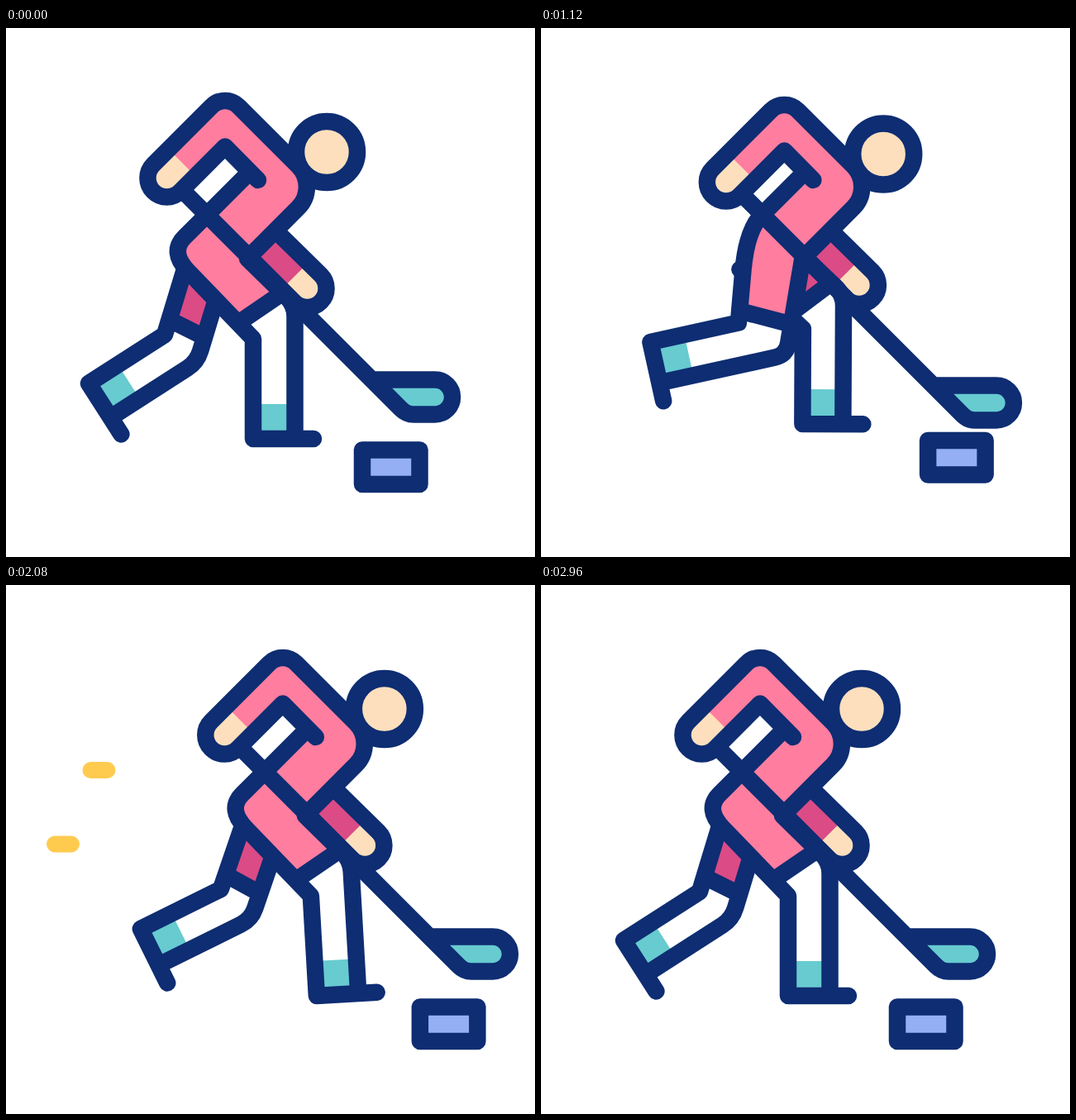
An HTML page for the animation above (3 s loop, 640 by 640 pixels).

```html
<!DOCTYPE html>
<html lang="en">
<head>
<meta charset="utf-8">
<title>Hockey player</title>
<style>
  html, body { margin: 0; width: 100%; height: 100%; overflow: hidden; background: #fff; }
  svg { display: block; width: 100vw; height: 100vh; }
  .ink, .speed { stroke: #0e2d72; stroke-width: 20.5; stroke-linecap: round; stroke-linejoin: round; }
  .speed { stroke: #ffcb4f; stroke-width: 20; }
  .none { fill: none; }
  .pink { fill: #ff7d9f; }
  .rose { fill: #db4b86; }
  .skin { fill: #fddfbd; }
  .teal { fill: #67cbd0; }
  .white { fill: #fff; }
  .blue { fill: #94aff4; }
</style>
</head>
<body>
<svg viewBox="0 0 640 640">
  <rect id="puck" class="ink blue" x="431" y="510.5" width="69.5" height="41.5"/>
  <g id="skater">
    <g id="farArm">
      <path class="rose" d="M326 245L380.8 298.7L348.2 331.3L300 283Z"/>
      <path class="skin" d="M365.8 283.7L380.8 298.7A23 23 0 0 1 348.2 331.3L333.2 316.3Z"/>
      <path class="ink none" d="M326 245L380.8 298.7A23 23 0 0 1 348.2 331.3L300 283"/>
    </g>
    <g id="farLeg"></g>
    <g id="nearLeg"></g>
    <path id="torso" class="pink"/>
    <path id="hand" class="skin" d="M229.3 179.3L210.8 197.8A23 23 0 0 1 178.2 165.2L196.7 146.7Z"/>
    <path id="outline" class="ink none"/>
    <path id="stick" class="ink teal" d="M218 201L478 461Q484.500 467.500 493 467.500H519A21 21 0 0 0 519 425.500H443"/>
    <circle id="head" class="ink skin" cx="388" cy="150" r="37"/>
  </g>
  <path id="lineA" class="speed none"/>
  <path id="lineB" class="speed none"/>
</svg>
<script>
const LOOP = 3000;
const NS = 'http://www.w3.org/2000/svg';
const $ = id => document.getElementById(id);

const clamp = u => Math.min(1, Math.max(0, u));
const smooth = u => (u = clamp(u), u * u * (3 - 2 * u));
const ramp = (t, from, to) => smooth((t - from) / (to - from));
const plateau = (t, a, b, c, d) => ramp(t, a, b) - ramp(t, c, d);

// Each stride dashes ahead, then drifts back; lines is when its streaks start.
const STRIDES = [{ start: 98, skew: .94, lines: 212 }, { start: 1530, skew: .84, lines: 1520 }];
const DASH = 362, DRIFT = 1070, REACH = 81;

function glide(t) {
  return REACH * STRIDES.reduce((sum, { start, skew }) => {
    const age = t - start;
    return sum + smooth(age / DASH) - smooth(clamp((age - DASH) / DRIFT) ** skew);
  }, 0);
}

// Smooth curve through keys [{ t, v }] that never overshoots.
function curve(keys, t) {
  const n = keys.length - 1;
  t = Math.min(keys[n].t, Math.max(keys[0].t, t));
  let i = 0;
  while (i < n - 1 && t > keys[i + 1].t) i++;
  const slope = k => k < 0 || k >= n ? 0 : (keys[k + 1].v - keys[k].v) / (keys[k + 1].t - keys[k].t);
  const tangent = k => {
    const a = slope(k - 1), b = slope(k);
    return a * b > 0 ? 2 * a * b / (a + b) : 0;
  };
  const a = keys[i], b = keys[i + 1], d = b.t - a.t, u = (t - a.t) / d;
  return a.v + (b.v - a.v) * smooth(u)
    + d * u * (1 - u) * (tangent(i) * (1 - u) - tangent(i + 1) * u);
}

// Knee x, y and heel x, y of each leg; the rest of a leg follows from them.
const stand = { near: [299, 376, 299, 497], far: [192, 371, 100, 430] };
const pass = { near: [244, 364, 147, 411], far: [258, 375, 238, 470] };
const push = { near: [212, 353, 104, 371], far: [294, 364, 300, 479] };
const trail = { near: [217, 360, 112, 389], far: [291, 364, 284, 479] };
const swing = { near: [290, 371, 269, 482], far: [203, 363, 113, 415] };
const reach = { near: [299, 376, 306, 497], far: [190, 368, 93, 416] };
const STEPS = [[80, stand], [320, pass], [620, push], [800, push], [1440, trail],
  [1500, trail], [1760, swing], [1920, reach], [2400, reach], [2960, stand]];

const add = (p, d, k) => [p[0] + d[0] * k, p[1] + d[1] * k];
const aim = (a, b) => {
  const x = b[0] - a[0], y = b[1] - a[1], len = Math.hypot(x, y);
  return [x / len, y / len];
};
const toward = (a, b, len) => add(a, aim(a, b), len);
const side = d => [d[1], -d[0]];
const mix = (a, b, f) => [a[0] + (b[0] - a[0]) * f, a[1] + (b[1] - a[1]) * f];
const cross = (a, b) => a[0] * b[1] - a[1] * b[0];
const meet = (p, d, q, e) => add(p, d, cross([q[0] - p[0], q[1] - p[1]], e) / cross(d, e));
const at = p => p.map(v => v.toFixed(2)).join(' ');
const line = (...pts) => 'M' + pts.map(at).join('L');

function makeLeg(name, { fill, top, hip, width, shin }) {
  const parts = [fill, 'white', 'teal', 'ink none'].map(cls => {
    const path = document.createElementNS(NS, 'path');
    path.setAttribute('class', cls);
    $(name + 'Leg').append(path);
    return path;
  });
  const keys = stand[name].map((_, i) => STEPS.map(([t, pose]) => ({ t, v: pose[name][i] })));
  return t => {
    const [kx, ky, hx, hy] = keys.map(k => curve(k, t));
    const knee = [kx, ky], heel = [hx, hy];
    const down = aim(top, knee), across = side(down);
    const shinDown = aim(knee, heel), foot = side(shinDown);
    const w = width(kx);
    const ankle = add(heel, foot, shin), toe = add(heel, foot, 73);
    const hemL = mix(top, knee, .77);
    const hemR = add(add(hemL, across, w), down, w * .17);
    const inHip = hip || add(top, across, w);
    const inner = meet(inHip, aim(inHip, hemR), ankle, shinDown);
    const bendA = toward(inner, inHip, 14), bendB = toward(inner, ankle, 14);

    let thigh = line(top);
    if (hip) {
      // The seat: the belly line and the thigh line joined by a curve.
      const seat = add(top, down, (469 - top[0] - top[1]) / (down[0] + down[1]));
      thigh = `M243 226L${at(add(seat, [1, -1], 18))}Q${at(seat)} ${at(top)}`;
    }
    const shapes = [
      thigh + 'L' + line(hemL, hemR, inHip).slice(1) + 'Z',
      line(hemL, knee, heel, ankle, bendB) + `Q${at(inner)} ${at(bendA)}L${at(hemR)}Z`,
      line(heel, ankle, toward(ankle, inner, 42), toward(heel, knee, 42)) + 'Z',
      thigh + 'L' + line(knee, heel, toe).slice(1) + line(hemL, hemR)
        + line(inHip, bendA) + `Q${at(inner)} ${at(bendB)}L${at(ankle)}`
    ];
    parts.forEach((p, i) => p.setAttribute('d', shapes[i]));
  };
}

const legs = [
  makeLeg('far', { fill: 'rose', top: [216, 292], width: kx => 47 + .17 * (kx - 192), shin: 49 }),
  makeLeg('near', { fill: 'pink', top: [220, 294], hip: [292, 279], width: () => 64, shin: 50.5 })
];

function drawTorso(s) {
  const p = (x, y) => at([x + s, y + s]);
  const d = `M305 184L${p(265, 143.5)}L${p(210.8, 197.8)}A23 23 0 0 1 ${p(178.2, 165.2)}`
    + `L${p(248.7, 94.7)}A23 23 0 0 1 ${p(281.3, 94.7)}`
    + 'L353.4 166.8A36 36 0 0 1 353.4 217.6L294 277';
  $('torso').setAttribute('d', d + 'L243 226L294 175Z');
  $('outline').setAttribute('d', d + 'M294 175L243 226');
}

// The front end of a streak runs ahead and the back end follows.
function drawLines(t) {
  const age = t - STRIDES[t < 1400 ? 0 : 1].lines;
  const front = ramp(age, 0, 430), back = ramp(age, 205, 635);
  for (const [id, x, y] of [['lineA', 356.5, 224], ['lineB', 313, 313.5]]) {
    $(id).setAttribute('d', `M${x - 254 * back} ${y}H${x - 254 * front}`);
    $(id).style.display = front > 0 && back < 1 ? '' : 'none';
  }
}

const move = (id, x, y) => $(id).setAttribute('transform', `translate(${x} ${y})`);

function draw() {
  const t = performance.now() % LOOP;
  const x = glide(t);
  const crouch = plateau(t, 480, 760, 1460, 1710);
  const lift = plateau(t, 0, 620, 840, 1480);
  move('skater', x, 0);
  move('puck', x + 21.5 * lift, -19.5 * lift);
  move('farArm', -4 * crouch, -4 * crouch);
  move('hand', 5 * crouch, 5 * crouch);
  move('stick', 7.5 * crouch, 7 * crouch);
  move('head', 1.8 * crouch, 2.5 * crouch);
  drawTorso(5 * crouch);
  legs.forEach(drawLeg => drawLeg(t));
  drawLines(t);
  requestAnimationFrame(draw);
}
draw();
</script>
</body>
</html>
```
